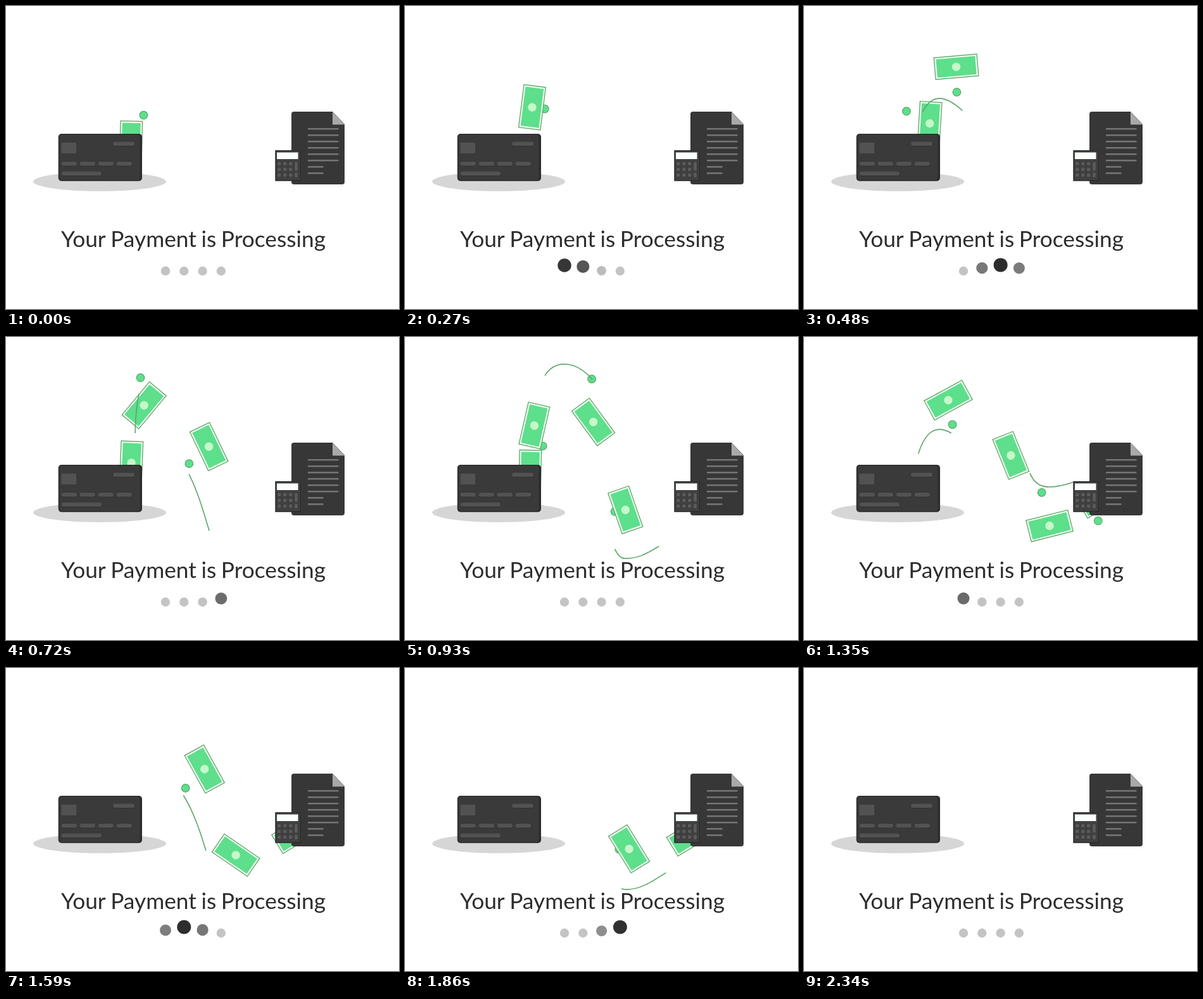
An HTML page with a canvas for the animation above (2460 ms loop, 621 by 479 pixels).

```html
<!DOCTYPE html>
<html>
<head>
<meta charset="utf-8">
<title>Payment processing</title>
<style>
  html, body { margin: 0; width: 100%; height: 100%; overflow: hidden; background: #fff; }
  canvas { display: block; }
  svg { position: absolute; width: 0; height: 0; }
</style>
</head>
<body>
<svg>
  <path id="billPath" d="M197.5 216 C199 150 205 96 244 96 C283 96 325 170 335 212 C343 245 344 285 365 297 C390 309 420 282 482 247"/>
  <path id="lowDotPath" d="M217 174 C220 165 228 137 240 136 C275 136 340 345 401 339 C430 337 455 300 478 276"/>
  <path id="highDotPath" d="M112 210 C185 190 190 45 245 41 C300 38 330 125 345 165 C355 215 360 280 440 240"/>
  <path id="lowTrailPath" d="M176 202 C190 140 215 130 255 170 C318 228 318 350 347 350 C385 352 410 318 480 284"/>
  <path id="highTrailPath" d="M205 200 C200 90 215 40 255 43 C300 46 335 125 345 165 C358 225 355 260 450 220"/>
</svg>
<canvas id="stage" width="621" height="479"></canvas>
<script>
const find = id => document.getElementById(id);
const ctx = find('stage').getContext('2d');
const billPath = find('billPath'), lowDotPath = find('lowDotPath'), highDotPath = find('highDotPath');
const lowTrailPath = find('lowTrailPath'), highTrailPath = find('highTrailPath');
const LOOP = 2460, STEP = 30, LAST = 2340, BILL_GAP = 300;
const INK = '#2d2c2e', GREEN = '#5ddf8c', EDGE = '#5ca667';

const progress = (t, start, duration) => Math.min(1, Math.max(0, (t - start) / duration));

function box(x, y, w, h, color, r = 0) {
  ctx.fillStyle = color;
  ctx.beginPath();
  ctx.roundRect(x, y, w, h, r);
  ctx.fill();
}

function disc(x, y, r, color) {
  ctx.fillStyle = color;
  ctx.beginPath();
  ctx.arc(x, y, r, 0, 7);
  ctx.fill();
}

function outline(width) {
  ctx.strokeStyle = EDGE;
  ctx.lineWidth = width;
  ctx.stroke();
}

function greenDot(path, distance) {
  if (distance < 0 || distance > path.getTotalLength()) return;
  const { x, y } = path.getPointAtLength(distance);
  disc(x, y, 6.3, GREEN);
  outline(1.2);
}

// Drifts slowly, then settles into a steady speed.
function lowDot(age) {
  if (age >= 0) greenDot(lowDotPath, 51.6 * Math.log(1 + Math.exp((age - 430) / 120)));
}

// A bill always points along its path.
function bill(age) {
  if (age < 0 || age >= 1440) return;
  const u = progress(age, 0, 1460);
  const eased = 0.25 * u + 0.375 * (1 - Math.cos(Math.PI * u));
  const distance = eased * billPath.getTotalLength();
  const { x, y } = billPath.getPointAtLength(distance);
  const back = billPath.getPointAtLength(distance - 1);
  const ahead = billPath.getPointAtLength(distance + 1);
  ctx.save();
  ctx.translate(x, y);
  ctx.rotate(Math.atan2(ahead.y - back.y, ahead.x - back.x) + Math.PI / 2);
  box(-17.3, -34, 34.6, 68, '#f1fcf0');
  outline(1.3);
  box(-14.5, -31, 29, 62, GREEN);
  disc(0, 0, 6.7, '#c6f8c9');
  ctx.restore();
}

function trail(path, tail, head) {
  if (head <= tail) return;
  const length = path.getTotalLength();
  ctx.save();
  ctx.setLineDash([(head - tail) * length, 2 * length]);
  ctx.lineDashOffset = -tail * length;
  ctx.strokeStyle = EDGE;
  ctx.lineWidth = 1.6;
  ctx.stroke(new Path2D(path.getAttribute('d')));
  ctx.restore();
}

function lowTrail(age) {
  trail(lowTrailPath, progress(age, 420, 800), 1 - (1 - progress(age, 330, 900)) ** 1.5);
}

function highTrail(age) {
  trail(highTrailPath, progress(age, 540, 960) ** 1.4, progress(age, 527, 869));
}

function shadow() {
  ctx.fillStyle = '#d5d6d5';
  ctx.beginPath();
  ctx.ellipse(148, 277.5, 105, 15.3, 0, 0, 7);
  ctx.fill();
}

function card() {
  box(82.7, 202, 132.3, 74.7, INK, 5);
  box(84.5, 203.5, 127, 71.5, '#3a3a3a', 4);
  box(87.5, 216, 23.5, 17, '#525252', 1);
  const bar = (x, y, w) => {
    box(x - 0.5, y - 0.5, w + 1, 8, '#303030', 4);
    box(x, y, w, 6.5, '#525252', 3.2);
  };
  bar(169, 214.5, 34);
  for (let i = 0; i < 4; i++) bar(87.5 + i * 29, 246, 24.5);
  bar(87.5, 261.5, 63.5);
}

function page() {
  ctx.fillStyle = '#373737';
  ctx.fill(new Path2D('M455 167 H516 L535 187 V278 Q535 282 531 282 H455 Q451 282 451 278 V171 Q451 167 455 167'));
  ctx.fillStyle = '#a9a9a9';
  ctx.fill(new Path2D('M516 167.5 L535 187.5 H516'));
  for (let i = 0; i < 8; i++) box(477, 193 + i * 10, i < 6 ? 48.5 : 24.5, 2.6, '#757575');
}

function calculator() {
  box(425.3, 228, 40.7, 48.7, INK);
  box(427, 229.5, 37.5, 45.5, '#414141');
  box(428, 231.5, 33.5, 10.5, '#fbfffb');
  const key = (x, y, w, h) => {
    box(x - 0.5, y - 0.5, w + 1, h + 1, '#2f2f2f');
    box(x, y, w, h, '#5a5a5a', 1);
  };
  for (let i = 0; i < 9; i++) key(429 + i % 3 * 9, 246.5 + Math.floor(i / 3) * 9, 5.5, 5.5);
  key(456, 246.5, 5, 14);
  key(456, 263.5, 5, 7.5);
}

function title() {
  ctx.fillStyle = INK;
  ctx.font = '35.3px Lato, sans-serif';
  ctx.wordSpacing = '-1.5px';
  ctx.fillText('Your Payment is Processing', 87, 380.5);
}

function loader(t) {
  for (let i = 0; i < 4; i++) {
    const age = (t + 20 - i * 126 + LOOP) % (LOOP / 2);
    const v = age < 500 ? Math.sin(Math.PI * age / 500) ** 2 : 0;
    const g = Math.round(196 - 151 * v);
    disc(252 + i * 29.3, 419 - 9.6 * v, 7.2 + 3.8 * v, `rgb(${g},${g},${g})`);
  }
}

function draw(t) {
  ctx.fillStyle = '#fff';
  ctx.fillRect(0, 0, 621, 479);
  shadow();
  greenDot(highDotPath, 0.475 * (t - 337));
  lowDot(t);
  lowDot(t - 3 * BILL_GAP);
  for (let i = 0; i < 4; i++) bill(t - i * BILL_GAP);
  lowTrail(t);
  lowTrail(t - 3 * BILL_GAP);
  highTrail(t);
  card();
  page();
  calculator();
  title();
  loader(t);
}

function tick() {
  const t = performance.now() % LOOP;
  draw(Math.min(LAST, Math.floor(t / STEP) * STEP));
  requestAnimationFrame(tick);
}
tick();
</script>
</body>
</html>
```
